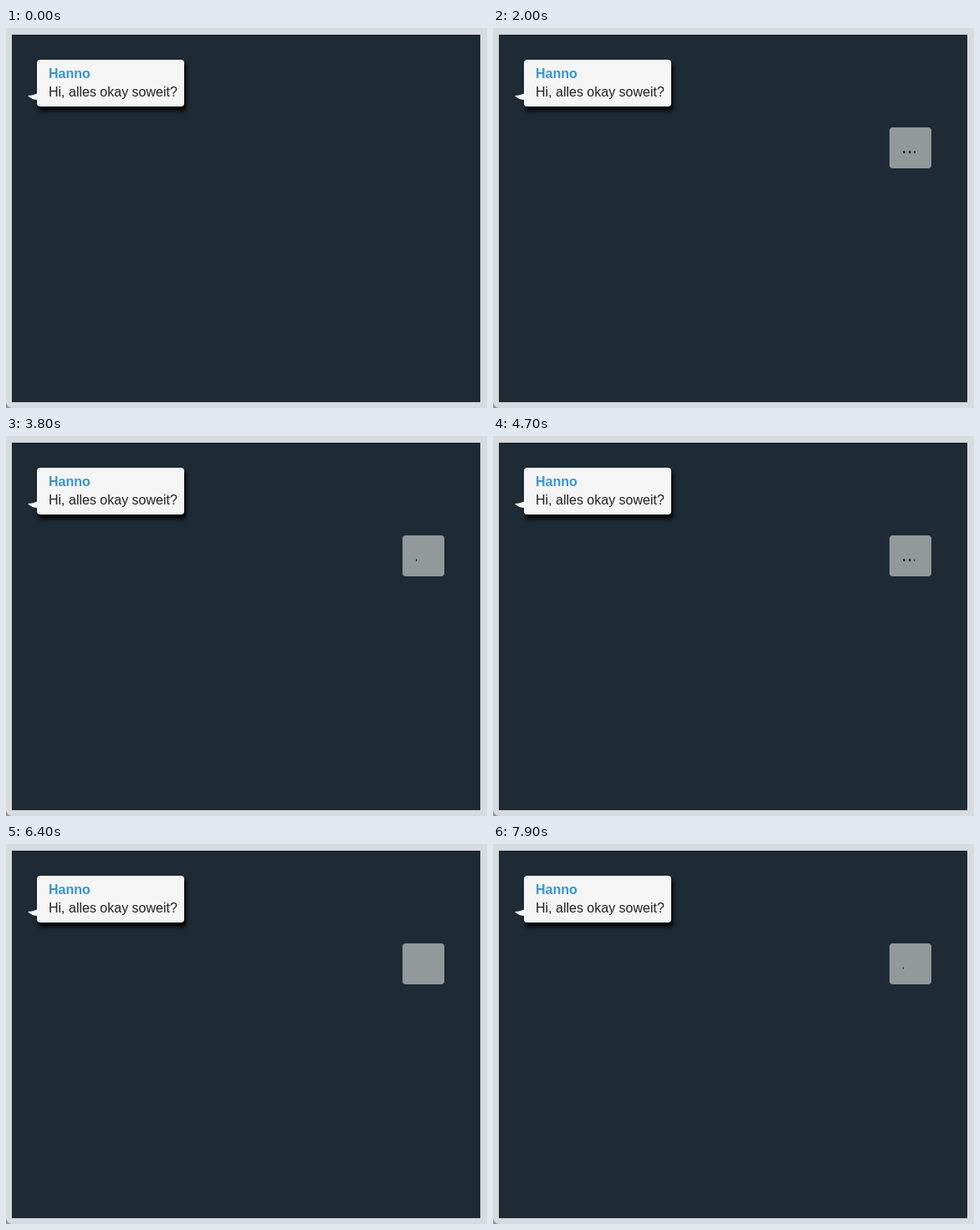
Animation of 575x455 px, one loop 8000 ms. Source, as an HTML page:

```html
<!DOCTYPE html>
<html lang="de">
<head>
<meta charset="utf-8">
<title>Chat</title>
<style>
  html, body { margin: 0; width: 575px; height: 455px; overflow: hidden; background: #94989b; }
  .frame { position: absolute; inset: 0; background: #d7dbde; border-bottom-left-radius: 8px; }
  .panel { position: absolute; left: 7px; top: 8px; width: 560px; height: 440px; background: #1e2a34; }
  .bubble {
    position: absolute; left: 37px; top: 38px; width: 176px; height: 56px;
    background: #f5f5f5; border-radius: 4px; box-shadow: 2px 5px 4px #000;
  }
  svg { position: absolute; left: 0; top: 0; }
  text { font: 16px "Liberation Sans", Arial, sans-serif; fill: #222; }
  .name { font-weight: bold; fill: #3a94d8; }
  .dots { font-size: 24px; fill: #000; }
</style>
</head>
<body>
<div class="frame"></div>
<div class="panel"></div>
<div class="bubble"></div>
<svg width="575" height="455" viewBox="0 0 575 455">
  <defs>
    <clipPath id="reveal"><rect id="window" x="487.64" y="120" width="0" height="47"/></clipPath>
  </defs>
  <path d="M38 78C34 80 30 81 26 81C29 84 33 86 38 86Z" fill="#f5f5f5"/>
  <text class="name" x="51" y="60">Hanno</text>
  <text x="51" y="82">Hi, alles okay soweit?</text>
  <g id="typing" visibility="hidden">
    <rect x="474" y="119" width="50" height="49" rx="4" fill="#93989b"/>
    <g clip-path="url(#reveal)"><text class="dots" x="488" y="150">...</text></g>
  </g>
</svg>
<script>
  const LOOP = 8000, TICK = 100;
  const APPEAR = 700;               // typing box pops in
  const PERIOD = 1373, RESET = 815; // ellipsis cycle and one of its restarts
  const WIDTH = 20;                 // full width of the ellipsis window

  const typing = document.getElementById("typing");
  const reveal = document.getElementById("window");

  function draw(now) {
    const t = Math.floor((now % LOOP) / TICK) * TICK;
    const phase = (t - RESET + PERIOD) % PERIOD / PERIOD;
    typing.setAttribute("visibility", t < APPEAR ? "hidden" : "visible");
    reveal.setAttribute("width", Math.max(0, WIDTH * phase));
  }

  const start = performance.now();
  function loop() {
    draw(performance.now() - start);
    requestAnimationFrame(loop);
  }
  loop();
</script>
</body>
</html>
```
